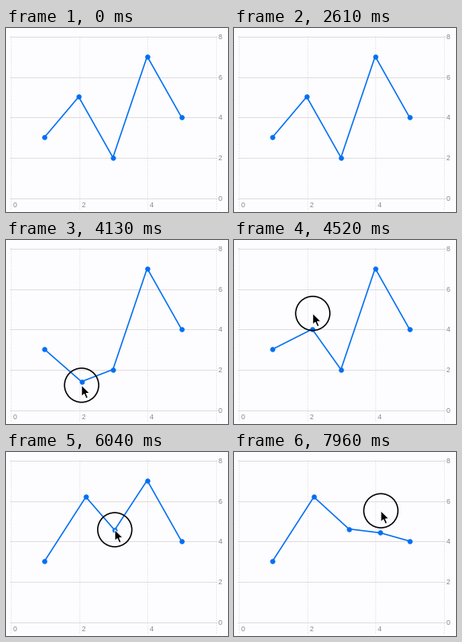
Recreate the animation shown at these times as a matplotlib script. Size 278 by 231 pixels, loop 8000 ms.

```python
import matplotlib.pyplot as plt
from matplotlib.animation import FuncAnimation
from matplotlib.patches import Circle, Polygon
import numpy as np

W, H, DPI = 278, 231, 64
PX = 72 / DPI              # one pixel in points
STEP, LOOP = 40, 8000      # ms
LAG = 40                   # the dragged point trails the pointer
HOLD = 150                 # pointer travel time before a drag takes hold
REST = 230                 # pause before and after each drag
RING = 100                 # ring shows this long before the drag

BLUE, GRID, DOTS, GREY = "#006ff3", "#dfdce0", "#d5d3d8", "#87868b"


def to_px(x, y):
    return 5.3 + 42.87 * x, 213.4 - 25.4 * y


START = np.array([to_px(x, y) for x, y in enumerate((3, 5, 2, 7, 4), 1)])

# each drag swings from its point to a turn, then on to its end
DRAGS = [
    dict(i=1, times=(3450, 4260, 4654), turn=(95, 191), end=(100, 56.4)),
    dict(i=2, times=(5700, 6000, 6400), turn=(136, 98), end=(143.8, 96.6)),
    dict(i=3, times=(7490, 7740, 8064), turn=(180.5, 193), end=(185, 36)),
]


def pointer_keys():
    keys = []
    for d in DRAGS:
        press, turn, end = d["times"]
        home = START[d["i"]]
        keys += [(press - REST, *home), (press, *home), (turn, *d["turn"]),
                 (end, *d["end"]), (end + REST, *d["end"])]
    return np.array(keys)


KEYS = pointer_keys()


def pointer(t):
    i = np.clip(np.searchsorted(KEYS[:, 0], t), 1, len(KEYS) - 1)
    (t0, *a), (t1, *b) = KEYS[i - 1], KEYS[i]
    u = np.clip((t - t0) / (t1 - t0), 0, 1)
    s = u * u * (3 - 2 * u)
    return np.array(a) * (1 - s) + np.array(b) * s


fig = plt.figure(figsize=(W / DPI, H / DPI), dpi=DPI, facecolor="#fdfcfe")
ax = fig.add_axes([0, 0, 1, 1])
ax.set_xlim(0, W)
ax.set_ylim(H, 0)
ax.axis("off")


def label(x, y, value):
    ax.text(x, y, str(value), color=GREY, fontsize=8.8 * PX,
            family="Liberation Sans", ha="center", va="center_baseline")


for v in range(0, 9, 2):
    y = int(to_px(0, v)[1]) + 0.5
    ax.plot([5, 264], [y, y], color=GRID, lw=PX, zorder=1)
    label(268, y + 0.2, v)

for v in range(0, 7, 2):
    x = int(to_px(v, 0)[0]) + 0.5
    ax.plot([x, x], [10, 228], color=DOTS, lw=PX, zorder=1,
            linestyle=(0, (1, 2)), dash_capstyle="butt")
    if v < 6:
        label(x + 5.4, 221.3, v)

line, = ax.plot([], [], color=BLUE, lw=1.6 * PX, marker="o",
                markersize=6.4 * PX, markeredgewidth=0, zorder=3,
                solid_joinstyle="round")
ring = Circle((0, 0), 21.4, fill=False, ec="black", lw=1.6 * PX, zorder=4)
ARROW = np.array([(0, 0), (0, 14), (3.2, 11.1), (5.6, 16.6), (8, 15.5),
                  (5.7, 10.2), (10.2, 10.1)])
arrow = Polygon(ARROW, fc="black", ec="white", lw=PX, zorder=5)
ax.add_patch(ring)
ax.add_patch(arrow)


def draw(frame):
    t = frame * STEP
    pts = START.copy()
    held = False
    for d in DRAGS:
        press, _, end = d["times"]
        if t - LAG > press + HOLD:
            pts[d["i"]] = pointer(min(t - LAG, end))
        held |= press - RING <= t < end + REST
    line.set_data(pts[:, 0], pts[:, 1])

    tip = pointer(t) - (0, 0.4)
    arrow.set_xy(ARROW + tip)
    arrow.set_visible(t >= DRAGS[0]["times"][0] - RING)
    ring.center = tuple(tip)
    ring.set_visible(held)
    return line, ring, arrow


anim = FuncAnimation(fig, draw, frames=LOOP // STEP, interval=STEP,
                     init_func=lambda: draw(0), repeat=True, repeat_delay=0)
plt.show()
```
